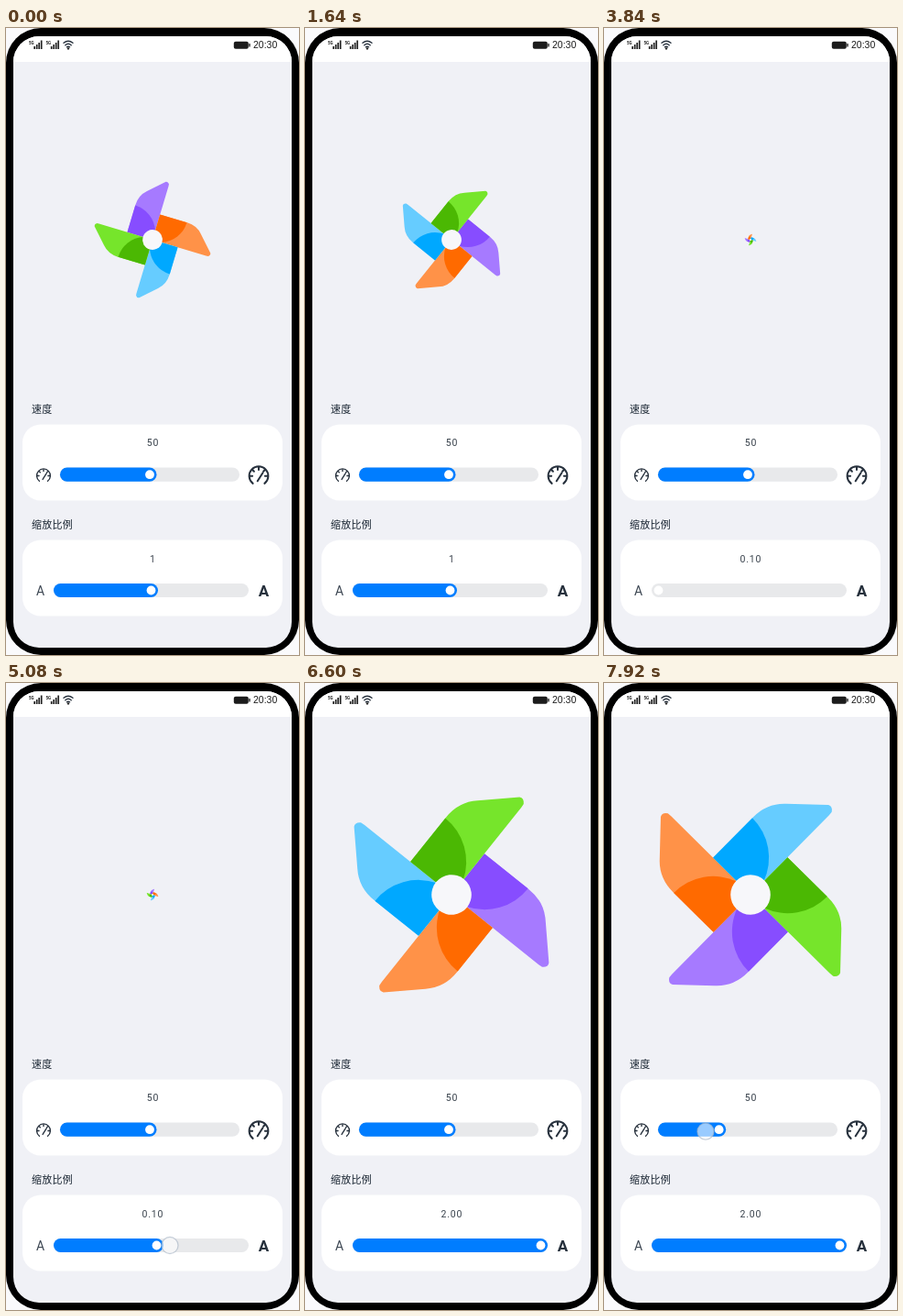
Write an HTML page that moves like this. It is 320x684 px and loops after 8 s.

```html
<!DOCTYPE html>
<html lang="zh">
<head>
<meta charset="utf-8">
<title>Pinwheel</title>
<style>
  html, body { margin: 0; width: 100%; height: 100%; overflow: hidden; background: #fafafc; }
  svg { display: block; width: 100%; height: 100%; }
  .label { font: 500 11px "Noto Sans CJK SC", "Noto Sans CJK", sans-serif; letter-spacing: .25px; fill: #182431; }
  .value { font: 400 10.5px Roboto, sans-serif; letter-spacing: .8px; text-anchor: middle; fill: #39424c; }
  .letter { font-family: Roboto, sans-serif; text-anchor: middle; }
  .clock { font: 10.5px "Liberation Sans", Arial, sans-serif; fill: #1c1c1c; }
  .net { font: 700 4.5px Roboto, sans-serif; fill: #222; }
  .line { fill: none; stroke: #27313d; stroke-linecap: round; }
</style>
</head>
<body>
<svg viewBox="0 0 320 684" preserveAspectRatio="none">
  <defs>
    <clipPath id="screen"><rect x="8" y="9" width="304" height="667" rx="28"/></clipPath>
    <g id="signal">
      <text class="net" x="0" y="17.5">5G</text>
      <path d="M6.2 23V20M8.7 23V18M11.2 23V16M13.7 23V13.5" stroke="#222" stroke-width="1.7"/>
    </g>
    <g id="gauge">
      <path d="M-6 7.6A9.8 9.8 0 1 1 6 7.6"/>
      <path d="M-9 0H-6.5M9 0H6.5M0 -9V-6.5M-6.4 -6.4L-4.8 -4.8M6.4 -6.4L4.8 -4.8M-1.2 5.2L4.2 -3.4"/>
    </g>
  </defs>

  <rect width="320" height="684" rx="38"/>
  <g clip-path="url(#screen)">
    <rect width="320" height="684" fill="#f0f1f6"/>
    <rect width="320" height="37" fill="#fff"/>
  </g>

  <use href="#signal" x="25"/>
  <use href="#signal" x="43.5"/>
  <g class="line" stroke-width="1.4">
    <path d="M63 16.3Q68 12.2 73 16.3M64.8 18.7Q68 16 71.2 18.7M66.4 20.8Q68 19.6 69.6 20.8"/>
  </g>
  <circle cx="68" cy="22.4" r="1.2" fill="#222"/>
  <rect x="248.8" y="14.8" width="16" height="8" rx="2" fill="#1c1c1c"/>
  <rect x="265.3" y="17" width="1.4" height="3.6" rx=".6" fill="#1c1c1c"/>
  <text class="clock" x="270" y="22">20:30</text>

  <g id="wheel"></g>

  <text class="label" x="28" y="419.5">速度</text>
  <text class="label" x="28" y="545.5">缩放比例</text>
  <g fill="#fff">
    <rect x="18" y="432.5" width="284" height="83" rx="20"/>
    <rect x="18" y="558.5" width="284" height="83" rx="20"/>
  </g>
  <text class="value" x="160.4" y="456.3">50</text>
  <text class="value" id="sizeText" x="160.4" y="582.5"></text>

  <use href="#gauge" class="line" stroke-width="1.8" transform="translate(41 488.5) scale(.76)"/>
  <use href="#gauge" class="line" stroke-width="1.9" transform="translate(276 488.8) scale(1.06)"/>
  <text class="letter" x="37.6" y="618.7" font-size="14" fill="#3c4652">A</text>
  <text class="letter" x="281.4" y="619.5" font-size="17" font-weight="700" fill="#27313d">A</text>

  <g id="sliders"></g>
  <circle id="touch" r="9" fill="#fff" fill-opacity=".6" stroke="#a9b6c4" stroke-opacity=".65" stroke-width="1.3"/>
</svg>
<script>
const LOOP = 8000, TICK = 40, TICKS_PER_STEP = 1.65;
const $ = id => document.getElementById(id);
const clamp = (v, lo, hi) => Math.min(hi, Math.max(lo, v));

// Blades: light shape, with a dark circular sector near the hub.
const blades = [['#a67aff', '#874dff'], ['#ff9248', '#ff6a00'], ['#66ccff', '#00a8ff'], ['#76e52b', '#4bb803']];
$('wheel').innerHTML = blades.map(([light, dark], i) => `
  <g transform="rotate(${i * 90})">
    <path fill="${light}" d="M0 0V-57.5H62Q84 -57.5 98 -42L129.5 -8.5Q132 -4 126.5 -.4L122 0Z"/>
    <path fill="${dark}" d="M0 0V-57.5H61A61 61 0 0 1 20.4 0Z"/>
  </g>`).join('') + '<circle r="21.8" fill="#f7f7fa"/>';

function makeSlider(left, right, y) {
  const g = document.createElementNS('http://www.w3.org/2000/svg', 'g');
  const bar = (fill, w) => `<rect x="${left}" y="${y - 7.6}" width="${w}" height="15.2" rx="7.6" fill="${fill}"/>`;
  g.innerHTML = bar('#e8e9eb', right - left) + bar('#007dff', 0) + `<circle cy="${y}" r="4.9" fill="#fff"/>`;
  $('sliders').append(g);
  const [, fill, thumb] = g.children;
  const min = left + 7.5, max = right - 7.5;
  return { y, show(x) {
    x = clamp(x, min, max);
    thumb.setAttribute('cx', x);
    fill.setAttribute('width', x > min ? x + 7.5 - left : 0);
  } };
}
const speed = makeSlider(59, 255, 487.2);
const size = makeSlider(52, 265, 613.5);

// Touch gestures in steps; the thumb follows the finger one step late.
const drags = [
  { slider: size, press: 36, move: 38, release: 49, from: 162.5, to: 34, rate: -15, thumb: 158.5 },
  { slider: size, press: 67, move: 69, release: 85, from: 59, to: 262, rate: 15, thumb: 59.5 },
  { slider: speed, press: 115, move: 117, release: 125, from: 158, to: 60, rate: -15.67, thumb: 157 }
];
const finger = (d, step) => clamp(d.from + d.rate * Math.max(0, step - d.move),
  Math.min(d.from, d.to), Math.max(d.from, d.to));

function draw(step) {
  const angle = step < 25 ? -73.3 + 4.48 * step : 38.7 + 4.8 * (step - 25);
  const [scale, text] = step < drags[0].release ? [1, '1'] : step < drags[1].release ? [.1, '0.10'] : [2, '2.00'];
  $('wheel').setAttribute('transform', `translate(160 231) rotate(${angle}) scale(${scale / 2})`);
  $('sizeText').textContent = text;

  speed.show(157);
  size.show(158.5);
  $('touch').style.display = 'none';
  for (const d of drags) {
    if (step < d.press) continue;
    d.slider.show(d.thumb + finger(d, step - 1) - d.from);
    if (step >= d.release) continue;
    $('touch').style.display = '';
    $('touch').setAttribute('cx', finger(d, step));
    $('touch').setAttribute('cy', d.slider.y + (d.slider === speed ? 2 : 0));
  }
}

const start = performance.now();
function frame() {
  const tick = Math.floor((performance.now() - start) % LOOP / TICK);
  draw(Math.floor((tick + .5) / TICKS_PER_STEP));
  requestAnimationFrame(frame);
}
frame();
</script>
</body>
</html>
```
